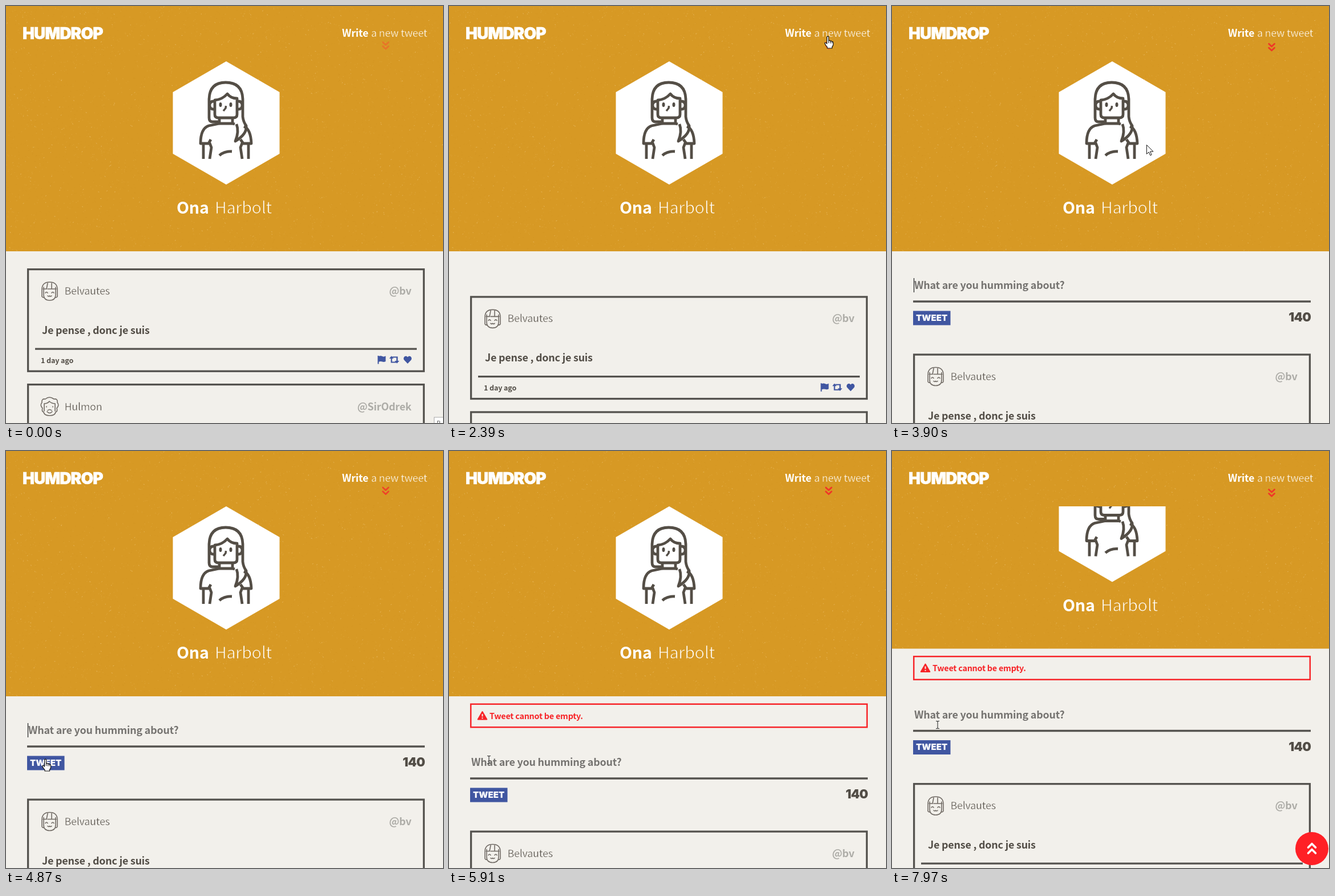
Recreate the animation shown at these times as an HTML page. Size 766 by 731 pixels, loop 8 s.

```html
<!DOCTYPE html>
<html lang="en">
<head>
<meta charset="utf-8">
<title>Humdrop</title>
<style>
html, body { margin: 0; width: 100%; height: 100%; overflow: hidden; background: #f2f0eb; }
svg { display: block; width: 766px; height: 731px; }
text { font-family: "Noto Sans CJK JP", "Noto Sans CJK SC", "Noto Sans CJK KR", "Noto Sans", sans-serif; font-size: 17.9px; white-space: pre; }
.bold { font-weight: 700; letter-spacing: -.2px; }
/* thins the regular weight with a background-coloured outline */
.thin { font-weight: 400; letter-spacing: -.23px; stroke: #f2f0eb; stroke-width: .4px; }
.onGold { stroke: #d79924; }
.block { font-family: Inter, sans-serif; font-weight: 900; }
.end { text-anchor: end; }
.big { font-size: 28.65px; }
.small { font-size: 12.5px; letter-spacing: -.1px; }
.ink { fill: #524d46; }
.line { fill: none; stroke: #54524e; stroke-width: 3.3; }
.sketch { fill: none; stroke: #544e46; stroke-width: 4.8; stroke-linejoin: round; }
.face { fill: none; stroke: #716b65; stroke-width: 1.6; stroke-linecap: round; stroke-linejoin: round; }
.blue { fill: #4056a1; }
.chev { fill: none; stroke-width: 2.7; stroke-linecap: round; stroke-linejoin: round; }
</style>
</head>
<body>
<svg viewBox="0 0 766 731">
  <defs>
    <g id="grain"></g>
    <clipPath id="navClip"><rect width="766" height="97"/></clipPath>
    <clipPath id="formClip"><rect id="formWindow" y="430" width="766" height="0"/></clipPath>
    <clipPath id="errorClip"><rect id="errorWindow" y="430" width="766" height="0"/></clipPath>
    <g id="cardBase">
      <rect class="line" x="38.6" y="461.6" width="693.8" height="178.6"/>
      <path class="line" d="M51 601.2H720"/>
      <text class="bold small ink" x="61" y="625.5">1 day ago</text>
      <g class="blue">
        <path d="M651.5 613h2v1q3-1.500 6 0t6-.5v9.500q-3 1.500-6 .5t-6 .3v3.700h-2z"/>
        <path d="M675.500 613.500l4 4.500h-2.700v5.500h6l2 2h-10.200v-7.500h-2.700zM676.500 614.500h10.200v7.500h2.700l-4 4.500-4-4.500h2.900v-5.500h-5.800z"/>
        <path d="M704 627l-6.200-6.500c-3-4.500 3-9.500 6.200-5 3.200-4.500 9.200.5 6.200 5z"/>
      </g>
    </g>
  </defs>

  <g id="page">
    <rect width="766" height="430" fill="#d79924"/>
    <use href="#grain"/>
    <path d="M386 97L479.500 151V259L386 313 292.500 259V151Z" fill="#fff"/>
    <g class="sketch">
      <path d="M374 203H362Q356 203 356 196V163Q357 134 385 134 414 134 415 163V194Q416 203 421 210 423 224 402 237 409 220 404 207"/>
      <path d="M366 169V190Q366 196 372 196H399Q405 196 405 190V162Q394 162 388 154 379 164 366 165Z"/>
      <path d="M364 167Q357 167 357 174T364 181M407 167Q414 167 414 174T407 181M374 197V206H397V197"/>
      <path d="M374 206L355 210Q341 215 341 241H355L359 234M397 206L401 207M417 211Q429 216 430 241H416L411 234M346 242V268M357 240L360 248 357 268M425 242V268M414 240L411 248 414 268M374 262Q383 254 396 255" />
      <path d="M385.500 175L385 179 381 184" stroke-width="3.5"/>
    </g>
    <g class="ink"><ellipse cx="376" cy="173" rx="2.500" ry="4"/><ellipse cx="394" cy="173" rx="2.500" ry="4"/></g>
    <text class="bold big" x="299" y="364" fill="#fff">Ona</text>
    <text class="thin onGold big" x="366" y="364" fill="#fff" style="stroke-width:.9px;letter-spacing:-.3px">Harbolt</text>

    <g clip-path="url(#errorClip)" fill="#f72428">
      <rect x="38.200" y="443.700" width="694.600" height="40.500" fill="none" stroke="#f72428" stroke-width="2.500"/>
      <path d="M58.500 457L66.300 470.500H50.700Z" stroke="#f72428" stroke-width="2" stroke-linejoin="round"/>
      <path d="M58.500 461V465.500M58.500 467.300V469.200" stroke="#f2f0eb" stroke-width="2"/>
      <text class="bold" x="71" y="469.500" style="font-size:14.3px">Tweet cannot be empty.</text>
    </g>

    <g id="form"><g clip-path="url(#formClip)">
      <text class="bold" x="39" y="496" fill="#757370">What are you humming about?</text>
      <path id="caret" d="M38.500 477V502" stroke="#222" stroke-width="1.200"/>
      <path class="line" d="M37 518H734"/>
      <rect class="blue" x="37" y="534.500" width="65.500" height="25"/>
      <text class="block" x="42" y="551.500" fill="#fff" style="font-size:15px">TWEET</text>
      <text class="block end ink" x="734" y="553" style="font-size:22px;letter-spacing:-.8px">140</text>
    </g></g>

    <g id="cards">
      <use href="#cardBase"/>
      <g class="face">
        <path d="M63 507V497Q63 484 76.500 484T90 497V507M66 493V506Q66 516 76.500 516T87 506V493M65 496H71L73 486M73 496H88M80 486V496M63 507Q62 511 67 511M90 507Q91 511 86 511"/>
        <path d="M69 503Q71 500 73 503M80 503Q82 500 84 503M73 508Q75 510 76.500 508 78 510 80 508"/>
      </g>
      <text class="thin" x="102.500" y="506" fill="#524d46">Belvautes</text>
      <text class="bold end" x="710.500" y="506" fill="#adaca7">@bv</text>
      <text class="bold ink" x="63" y="575">Je pense , donc je suis</text>
      <g transform="translate(0 202)">
        <use href="#cardBase"/>
        <g class="face">
          <path d="M64 503Q59 498 63 493 62 486 69 487 76 481 84 487 91 486 90 493 94 498 89 503 91 508 87 510 86 516 76.500 516T66 510Q62 508 64 503M67 508V495Q73 495 76 491 80 495 86 495V508"/>
          <path d="M71 500V501M82 500V501M73 507Q76.500 504 80 507M72 509Q76.500 514 81 509"/>
        </g>
        <text class="thin" x="102.500" y="506.500" fill="#524d46">Hulmon</text>
        <text class="bold end" x="710.500" y="506.500" fill="#adaca7">@SirOdrek</text>
      </g>
    </g>
  </g>

  <g clip-path="url(#navClip)">
    <rect width="766" height="97" fill="#d79924"/>
    <use href="#grain"/>
  </g>
  <text class="block" x="29" y="58" fill="#fff" stroke="#fff" stroke-width=".6" style="font-size:28px;letter-spacing:-.9px">HUMDROP</text>
  <text class="bold" x="589" y="53.500" fill="#fff">Write</text>
  <text class="thin onGold" x="640" y="53.500" fill="#fff">a new tweet</text>
  <path id="hint" class="chev" d="M660.500 63.500l5 4.800 5-4.800m-10 7l5 4.800 5-4.800"/>

  <g id="toTop">
    <circle cx="736" cy="697" r="29" fill="#ff2026"/>
    <path class="chev" stroke="#fff" style="stroke-width:3.6" d="M729.500 695l6.500-6.500 6.500 6.500m-13 10l6.500-6.500 6.500 6.500"/>
  </g>
  <g id="corner">
    <rect x="750.500" y="721" width="20" height="15" fill="#fff" stroke="#aaa"/>
    <text x="755" y="735" fill="#555" style="font-size:10px">R</text>
  </g>

  <g id="cursor">
    <path id="arrow" d="M0 0V16L3.800 12.500 6.300 18.300 8.700 17.300 6.200 11.600H11.500Z" fill="#fff" stroke="#111"/>
    <g id="hand">
      <path d="M-1.500 1Q0-.7 1.500 1V7.500Q3.500 6 4.500 8.300 6.500 7 7.300 9.300 9.500 8.500 9.500 11V14Q9.500 17 7.500 18.500V21H-1V19Q-3.500 16-5 12.500-5-10.500 12.500-3.500 10.500-1.500 12Z" visibility="hidden"/>
      <path d="M-1.500 12V1.200Q0-.9 1.500 1.200V8Q3.500 6.500 4.500 8.700 6.500 7.500 7.300 9.700 9.500 9 9.500 11.500V14Q9.500 17 7.500 18.500V21H-1V19Q-4 16-5.300 12.500-5 9.700-1.500 13Z" fill="#fff" stroke="#111" stroke-width="1.200" stroke-linejoin="round"/>
      <path d="M1.500 8V12M4.500 9V12.500M7.200 10V12.500" stroke="#111"/>
    </g>
    <path id="beam" d="M-3-6.500H-1L0-5.500 1-6.500H3M0-5.500V5.500M-3 6.500H-1L0 5.500 1 6.500H3" fill="none" stroke="#333" stroke-width="1.100"/>
  </g>
</svg>
<script>
const LOOP = 8000;
const $ = id => document.getElementById(id);
const show = (id, on) => $(id).setAttribute('visibility', on ? 'visible' : 'hidden');
const move = (id, x, y) => $(id).setAttribute('transform', `translate(${x} ${y})`);
const clamp = v => Math.max(0, Math.min(1, v));
const swing = p => .5 - Math.cos(clamp(p) * Math.PI) / 2;

// speckled paper texture
let seed = 7;
const rnd = () => (seed = seed * 16807 % 2147483647) / 2147483647;
function grain(count, size, colour, opacity) {
  let d = '';
  for (let i = 0; i < count; i++) {
    const at = [rnd() * 766, rnd() * 430].map(v => v.toFixed(1));
    const by = [rnd() - .5, rnd() - .5].map(v => (v * size * 2).toFixed(1));
    d += `M${at}l${by}`;
  }
  $('grain').insertAdjacentHTML('beforeend',
    `<path d="${d}" stroke="${colour}" stroke-width=".9" stroke-linecap="round" opacity="${opacity}"/>`);
}
grain(2600, .8, '#b87a12', .16);
grain(2400, .8, '#ffe0a0', .2);
grain(420, 1.2, '#ffe9bd', .42);

// [time, x, y]
const cursorPath = [
  [700, 758, 735], [1000, 722, 520], [1300, 692, 230], [1500, 678, 106], [1750, 664, 53],
  [3530, 664, 53], [3650, 640, 75], [4000, 370, 310], [4330, 76, 529], [4500, 69, 540],
  [5240, 69, 540], [5250, 70, 541], [6770, 70, 541], [7100, 65, 546], [7350, 63, 550],
  [7580, 63, 550], [7970, 80, 480]
];
const cursorKinds = [[0, 'none'], [700, 'arrow'], [1700, 'hand'], [3600, 'arrow'],
  [4400, 'hand'], [5250, 'beam'], [7300, 'arrow'], [7800, 'beam']];
const scrollPath = [[7040, 0], [7100, 11], [7250, 47], [7400, 74], [7550, 83.5]];

function along(path, t) {
  const next = path.findIndex(p => p[0] > t);
  if (next < 0) return path[path.length - 1].slice(1);
  if (next === 0) return path[0].slice(1);
  const a = path[next - 1], b = path[next], k = (t - a[0]) / (b[0] - a[0]);
  return a.slice(1).map((v, i) => v + (b[i + 1] - v) * k);
}

function render(t) {
  const form = 149.5 * swing((t - 2237) / 400);
  const error = 56 * swing((t - 5020) / 400);
  const [scroll] = along(scrollPath, t);
  move('page', 0, -scroll);
  move('form', 0, error);
  move('cards', 0, form + error);
  $('formWindow').setAttribute('height', form);
  $('errorWindow').setAttribute('height', error);
  show('caret', t > 2637 && t < 5000 && (t - 2637) % 1000 < 500);

  const phase = 1 - Math.abs(t % 1200 / 600 - 1);
  const bounce = swing(phase ** .8);
  const heat = clamp(bounce * 10);
  move('hint', 0, bounce * 4.5);
  $('hint').setAttribute('stroke', `rgb(${232 + 8 * heat} ${116 - 62 * heat} 40)`);

  show('toTop', scroll > 0);
  show('corner', t < 520);
  const [x, y] = along(cursorPath, t);
  const kind = cursorKinds.filter(k => k[0] <= t).pop()[1];
  move('cursor', x, y);
  for (const id of ['arrow', 'hand', 'beam']) $(id).style.display = id === kind ? '' : 'none';
}

const start = performance.now();
function tick(now) {
  render(Math.max(0, now - start) % LOOP);
  requestAnimationFrame(tick);
}
render(0);
requestAnimationFrame(tick);
</script>
</body>
</html>
```
